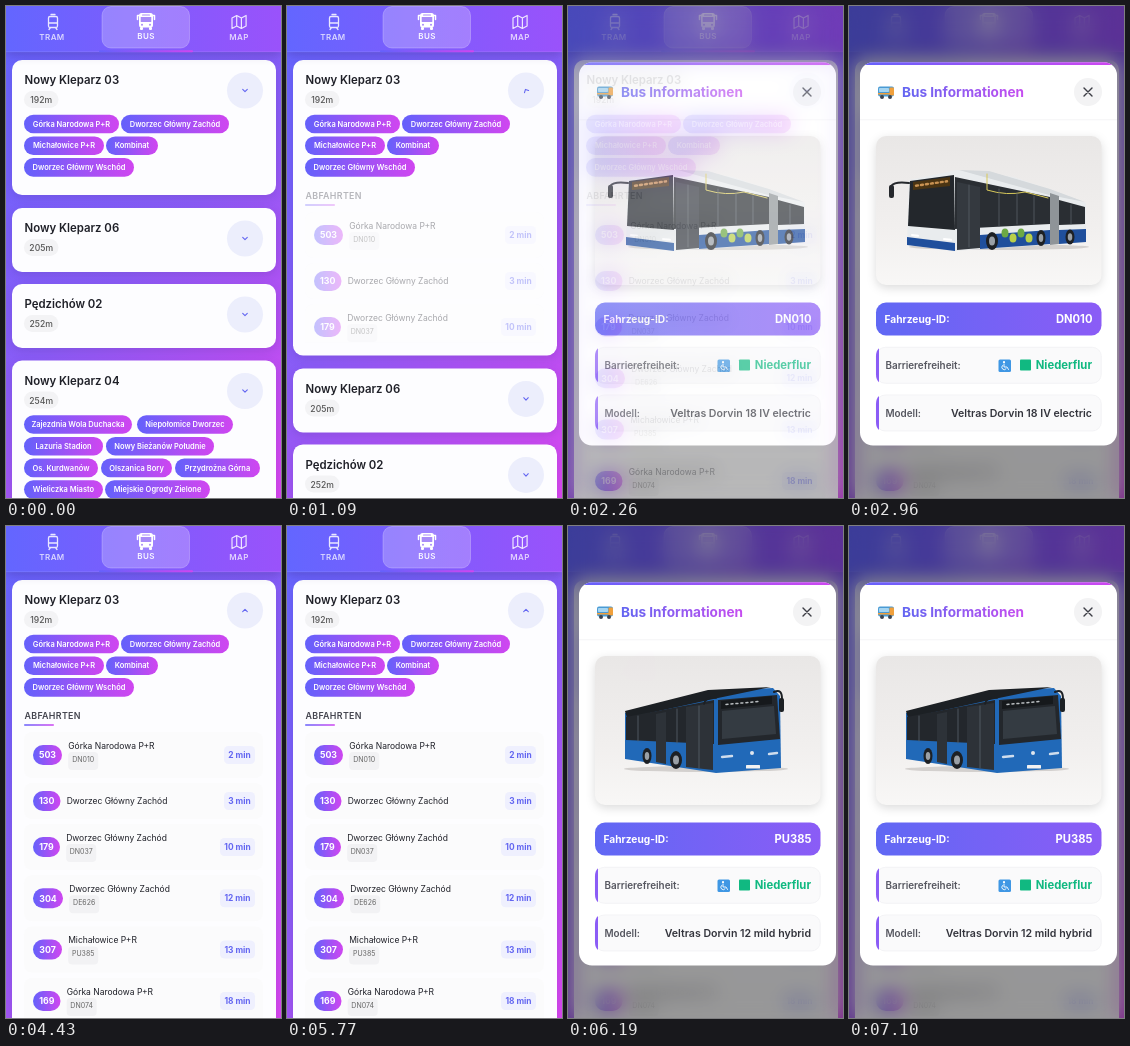
Recreate the animation shown at these times as an HTML page. Size 275 by 492 pixels, loop 8000 ms.

```html
<!DOCTYPE html>
<html lang="de">
<head>
<meta charset="utf-8">
<title>Abfahrten</title>
<style>
  html, body { margin: 0; width: 100%; height: 100%; overflow: hidden; }
  body { position: relative; background: linear-gradient(135deg, #6366ff, #8b5cf6 50%, #d946ef); }
  svg { position: absolute; inset: 0; width: 100%; height: 100%; font-family: Inter, sans-serif; }
  .card { filter: drop-shadow(0 3px 5px rgba(40, 20, 90, .14)); }
  #overlay { position: absolute; inset: 0; background: rgba(0, 0, 0, .4); backdrop-filter: blur(10px); }
</style>
</head>
<body>
<svg id="page" viewBox="0 0 275 492"></svg>
<div id="overlay"><svg id="modal" viewBox="0 0 275 492"></svg></div>
<script>
const $ = id => document.getElementById(id);

// ---- drawing helpers ----
const rect = (x, y, w, h, r, fill, more = '') =>
  `<rect x="${x}" y="${y}" width="${w}" height="${h}" rx="${r}" fill="${fill}" ${more}/>`;
const circle = (x, y, r, fill) => `<circle cx="${x}" cy="${y}" r="${r}" fill="${fill}"/>`;
const poly = (fill, points) => `<polygon fill="${fill}" points="${points}"/>`;
const line = (d, color, width, more = '') =>
  `<path d="${d}" fill="none" stroke="${color}" stroke-width="${width}" stroke-linecap="round" stroke-linejoin="round" ${more}/>`;
// cy is the middle of the capitals
const text = (x, cy, size, weight, fill, str, anchor = 'start', more = '') =>
  `<text x="${x}" y="${cy + size * .364}" font-size="${size}" font-weight="${weight}" fill="${fill}" text-anchor="${anchor}" ${more}>${str}</text>`;
const gradient = (id, from, to) =>
  `<linearGradient id="${id}"><stop stop-color="${from}"/><stop offset="1" stop-color="${to}"/></linearGradient>`;

// ---- stop list ----
const pill = (x, w, cy, str) =>
  rect(x, cy - 9.3, w, 18.6, 9.3, 'url(#accent)') + text(x + w / 2, cy, 7.5, 600, '#fff', str, 'middle');

const cardHead = (top, name, distance, rows = []) =>
  text(18.5, top + 20, 11.4, 600, '#1f2028', name) +
  rect(18, top + 31, 34.5, 17, 8.5, '#f3f3f5') +
  text(35.2, top + 40, 8.6, 500, '#555', distance, 'middle') +
  circle(239, top + 30.5, 18, '#eceefc') +
  rows.map((row, i) => row.map(([x, w, str]) => pill(x, w, top + 64 + i * 21.7, str)).join('')).join('');

const chevron = (cy, id = '') =>
  `<g transform="translate(239 ${cy})"><g id="${id}">${line('M-2.3 -1.2L0 1.2L2.3 -1.2', '#6366f1', 1.1)}</g></g>`;

const card = (top, height, ...head) =>
  `<g class="card">${rect(6, top, 264, height, 10, '#fdfdff')}</g>` + cardHead(top, ...head) + chevron(top + 30.5);

const departure = (cy, number, badge, name, id, time) => {
  const h = id ? 46 : 36, x = 33.2 + badge, w = time > 9 ? 35 : 31;
  return rect(18, cy - h / 2, 239, h, 8, '#fbfbfc') +
    rect(27, cy - 10, badge, 20, 10, 'url(#accent)') +
    text(27 + badge / 2, cy, 8.8, 700, '#fff', number, 'middle') +
    text(x, cy - (id ? 9.5 : 0), 8.5, 400, '#1f2028', name) +
    (id ? rect(x, cy - 3, 30, 18, 4, '#f2f2f4') + text(x + 15, cy + 4, 7, 400, '#666', id, 'middle') : '') +
    rect(249 - w, cy - 9, w, 18, 4.5, '#eff0fe') +
    text(249 - w / 2, cy, 8.4, 700, '#6366f1', time + ' min', 'middle');
};

const header = `<g id="header">` +
  rect(0, 0, 275, 46, 0, 'url(#bar)', 'style="filter:drop-shadow(0 3px 5px rgba(40,20,90,.25))"') +
  rect(0, 45.5, 275, .7, 0, 'rgba(255,255,255,.15)') +
  rect(93, 44.2, 94, 2, 1, 'url(#accent)') +
  rect(96, .5, 87.5, 41.5, 9, 'rgba(255,255,255,.23)', 'stroke="rgba(255,255,255,.3)" stroke-width=".8"') +
  [['TRAM', 46, 31, .75], ['BUS', 140, 30, .95], ['MAP', 233, 31, .75]].map(([s, x, y, a]) =>
    text(x, y, 8, 600, `rgba(255,255,255,${a})`, s, 'middle', 'letter-spacing=".4"')).join('') +
  line('M44 10.5h6q1.5 0 1.5 1.5v8q0 1.5-1.5 1.5h-6q-1.5 0-1.5-1.5v-8q0-1.5 1.5-1.5zM42.5 17h9M45 8.5h4M44.5 21.5l-1.5 2M49.5 21.5l1.5 2', '#fff', 1.3, 'opacity=".85"') +
  rect(133, 7, 14, 14.5, 2.5, '#fff') + rect(134.7, 11, 10.6, 5, .5, '#a98cf8') +
  rect(136, 8.6, 8, 1, .5, '#a98cf8') + circle(136, 18.7, 1, '#a98cf8') + circle(144, 18.7, 1, '#a98cf8') +
  rect(134, 21, 3, 3, 1, '#fff') + rect(143, 21, 3, 3, 1, '#fff') +
  line('M133 9.5h-1.5v4M147 9.5h1.5v4', '#fff', 1.5) +
  line('M226 12l4.7-2.5l4.7 2.5l4.7-2.5v10.5l-4.7 2.5l-4.7-2.5l-4.7 2.5zM230.7 9.5v10.5M235.4 12v10.5', '#fff', 1.2, 'opacity=".85"') +
  `</g>`;

$('page').innerHTML = `<defs>${gradient('accent', '#6461fb', '#d046f0')}${gradient('bar', '#6366ff', '#9a52fb')}
  <clipPath id="clip"><rect id="clipBox" x="6" y="176" width="264" height="0"/></clipPath></defs>` +
  `<g class="card"><rect id="firstCard" x="6" y="54" width="264" rx="10" fill="#fdfdff"/></g>` +
  cardHead(54, 'Nowy Kleparz 03', '192m', [
    [[18, 95, 'Górka Narodowa P+R'], [115, 108, 'Dworzec Główny Zachód']],
    [[18, 80, 'Michałowice P+R'], [100, 52, 'Kombinat']],
    [[18, 110, 'Dworzec Główny Wschód']]]) +
  chevron(84.5, 'arrow') +
  `<g clip-path="url(#clip)"><g id="departures">` +
  text(18.5, 190, 8.9, 600, '#44454f', 'ABFAHRTEN', 'start', 'letter-spacing=".3"') +
  rect(18, 198.3, 30, 1.5, .7, 'url(#accent)') +
  departure(229, 503, 29, 'Górka Narodowa P+R', 'DN010', 2) +
  departure(275, 130, 27.5, 'Dworzec Główny Zachód', '', 3) +
  departure(321, 179, 27, 'Dworzec Główny Zachód', 'DN037', 10) +
  departure(372.3, 304, 30, 'Dworzec Główny Zachód', 'DE626', 12) +
  departure(423.5, 307, 29, 'Michałowice P+R', 'PU385', 13) +
  departure(475, 169, 27.5, 'Górka Narodowa P+R', 'DN074', 18) +
  `</g></g><g id="others">` +
  card(202, 64, 'Nowy Kleparz 06', '205m') +
  card(278, 64, 'Pędzichów 02', '252m') +
  card(354.5, 170, 'Nowy Kleparz 04', '254m', [
    [[18, 108, 'Zajezdnia Wola Duchacka'], [131, 96, 'Niepołomice Dworzec']],
    [[18, 79, 'Lazuria Stadion'], [100, 108, 'Nowy Bieżanów Południe']],
    [[18, 74, 'Os. Kurdwanów'], [95, 71, 'Olszanica Bory'], [169, 85, 'Przydrożna Górna']],
    [[18, 79, 'Wieliczka Miasto'], [99, 105, 'Miejskie Ogrody Zielone']]]) +
  `</g>` + header;

// ---- vehicle dialog ----
const wheel = (x, y, rx, ry) =>
  `<ellipse cx="${x}" cy="${y}" rx="${rx}" ry="${ry}" fill="#1d2024"/><ellipse cx="${x}" cy="${y}" rx="${rx * .5}" ry="${ry * .5}" fill="#9aa0a6"/>`;
const shadow = (x, y, rx) => `<ellipse cx="${x}" cy="${y}" rx="${rx}" ry="3" fill="#d3d0ce"/>`;

const longBus = shadow(150, 241, 90) +
  poly('#e9ecee', '60,174 108,164 165,171 201,184 237,197 237,236 106,245 58,239') +
  poly('#d5d9dc', '110,164 140,165 201,183 236,196 200,189') +
  poly('#23272c', '61,175 105,169 106,224 59,220') +
  poly('#2a2e33', '106,171 201,191 201,218 106,223') +
  poly('#2a2e33', '210,194 236,201 236,218 210,219') +
  poly('#34393f', '108,176 131,181 131,242 108,244') +
  poly('#1f4f9c', '58,231 106,237 106,245 58,239') +
  poly('#1f4f9c', '131,229 201,224 201,238 131,243') +
  poly('#1f4f9c', '210,224 237,223 237,236 210,238') +
  poly('#8f9498', '201,187 210,190 210,238 201,239') +
  poly('#4a3413', '64,176 101,171 101,180 64,184') +
  line('M67 179.7L98 175.3', '#c99252', 2.4, 'stroke-dasharray="2 3"') +
  line('M138 168v16q20 6 38 2l23 6', '#d8c95a', 1) +
  [156, 164, 172, 180].map((x, i) => `<ellipse cx="${x}" cy="${227 + i % 2 * 5}" rx="3.5" ry="4.5" fill="${i % 2 ? '#b9cf4a' : '#6ca944'}"/>`).join('') +
  line('M120 179v62M150 183v37M168 187v31M185 190v28M222 199v19', '#596067', .8) +
  line('M60 177Q46 175 42 180', '#25282c', 2) + rect(40, 179, 5, 13, 2, '#25282c') +
  line('M63 229l6 .8M95 233l7 .8', '#fff', 2) +
  wheel(143, 235, 6, 9) + wheel(192, 232, 4.5, 8) + wheel(221, 231, 4.5, 7.5);

const shortBus = shadow(138, 243, 82) +
  poly('#2169b8', '57,187 140,165 205,162 212,170 213,242 148,247 57,233') +
  poly('#1c2024', '57,185 140,164 203,161 150,172 59,192') +
  poly('#23272c', '58,191 146,174 146,218 58,214') +
  poly('#23272c', '150,174 209,169 212,213 150,219') +
  poly('#2d3238', '118,181 145,177 145,244 118,241') +
  poly('#2d3238', '88,188 98,186 98,238 88,236') +
  poly('#343b42', '154,185 206,180 208,208 154,213') +
  poly('#16191c', '153,175 204,170 204,178 153,183') +
  line('M158 178.5L190 175.5', '#b9bdc0', 1.5, 'stroke-dasharray="2 3"') +
  line('M70 190v25M109 183v34M131 180v62', '#5a646d', .8) +
  line('M154 231l10-1M201 228l8-1', '#cfdded', 2.4) +
  rect(178, 239, 14, 3.5, .5, '#f2f2f2') + circle(184, 227, 2, '#dfe6ee') +
  line('M206 166Q214 162 214 173', '#1c2024', 2) + rect(211, 172, 5, 14, 2, '#1c2024') +
  line('M148 172Q138 170 136 178', '#1c2024', 1.6) +
  wheel(108, 234, 6, 9) + wheel(79, 230, 4.5, 8);

const infoRow = (cy, label) =>
  rect(27.3, cy - 18, 225, 36, 9, '#fafafb', 'stroke="#efeff2" stroke-width=".7"') +
  `<path d="M30 ${cy - 17}q-3 2.5-3 8v18q0 5.5 3 8z" fill="#8b5cf6"/>` +
  text(36.5, cy, 9.9, 600, '#55565f', label);

const vehicle = (id, fleet, model, bus) => `<g id="${id}">` + bus +
  text(243.5, 313, 11.2, 700, '#fff', fleet, 'end') + text(243, 407, 10.6, 600, '#33343c', model, 'end') + '</g>';

$('modal').innerHTML = `<defs>${gradient('title', '#6366f1', '#c64df0')}${gradient('idBar', '#6068f4', '#8b5cf6')}
  <linearGradient id="studio" x2="0" y2="1"><stop stop-color="#e9e7e6"/><stop offset=".6" stop-color="#f1efee"/><stop offset="1" stop-color="#f8f7f6"/></linearGradient>
  <clipPath id="frame"><rect x="11" y="56.2" width="257" height="383.3" rx="13"/></clipPath></defs>
  <g id="dialog"><g clip-path="url(#frame)">` +
  rect(11, 56, 257, 384, 0, '#fff') + rect(11, 56, 257, 3, 0, 'url(#accent)') + '</g>' +
  rect(11, 113.5, 257, .7, 0, '#f0f0f2') +
  rect(29, 80.5, 16, 10, 2, '#4a9bd4') + rect(30, 82, 10, 4, .8, '#a5d5f2') +
  rect(40.5, 81.5, 4.5, 8, 1, '#f0a03c') + rect(29, 87, 16, 1.5, 0, '#f0a03c') +
  circle(33, 91, 2, '#39424e') + circle(41, 91, 2, '#39424e') +
  text(53, 86.3, 13.6, 700, 'url(#title)', 'Bus Informationen') +
  circle(239, 86, 14, '#f3f3f4') + line('M235 82l8 8M243 82l-8 8', '#3c3d45', 1.4) +
  rect(27, 130, 225.5, 149, 10, 'url(#studio)', 'style="filter:drop-shadow(0 3px 5px rgba(0,0,0,.14))"') +
  rect(27, 296.5, 225.5, 33, 10, 'url(#idBar)') + text(35.5, 313, 10.2, 700, '#fff', 'Fahrzeug-ID:') +
  infoRow(359.3, 'Barrierefreiheit:') + infoRow(407, 'Modell:') +
  rect(149.5, 353.5, 12.5, 12.5, 1.5, '#3f97e4') + circle(155, 356.2, 1.1, '#fff') +
  line('M155 358v3h3l1.5 2.5M153.5 359.5a2.4 2.4 0 1 0 3.5 3.4', '#fff', .9) +
  rect(171, 353.5, 11, 11, .8, '#10b981') + text(243, 359.3, 11.3, 700, '#10b981', 'Niederflur', 'end') +
  vehicle('first', 'DN010', 'Veltras Dorvin 18 IV electric', longBus) +
  vehicle('second', 'PU385', 'Veltras Dorvin 12 mild hybrid', shortBus) + '</g>';

// ---- timing ----
const bezier = (x1, y1, x2, y2) => p => {
  if (p <= 0) return 0;
  if (p >= 1) return 1;
  const at = (a, b, s) => 3 * a * s * (1 - s) ** 2 + 3 * b * s * s * (1 - s) + s ** 3;
  let lo = 0, hi = 1;
  for (let i = 0; i < 24; i++) {
    const mid = (lo + hi) / 2;
    if (at(x1, x2, mid) < p) lo = mid; else hi = mid;
  }
  return at(y1, y2, lo);
};
const ease = bezier(.25, .1, .25, 1), standard = bezier(.4, 0, .2, 1), settle = bezier(.16, 1, .3, 1);

const LOOP = 8000, EXPAND = 920, OPEN_FIRST = 2100, CLOSE_FIRST = 4430, OPEN_SECOND = 5820;

function draw(t) {
  const grow = standard((t - EXPAND) / 560), extra = 420 * grow;
  $('firstCard').setAttribute('height', 135 + extra);
  $('clipBox').setAttribute('height', extra);
  $('departures').setAttribute('opacity', grow);
  $('others').setAttribute('transform', `translate(0 ${extra})`);
  $('arrow').setAttribute('transform', `rotate(${180 * standard((t - EXPAND) / 300)})`);

  const isFirst = t < CLOSE_FIRST, since = t - (isFirst ? OPEN_FIRST : OPEN_SECOND);
  $('overlay').style.display = since > 0 ? '' : 'none';
  $('overlay').style.opacity = ease(since / 400);
  const rest = 1 - settle(since / 200);
  $('dialog').setAttribute('transform', `translate(139.5 ${248 + 16 * rest}) scale(${1 - .05 * rest}) translate(-139.5 -248)`);
  $('first').style.display = isFirst ? '' : 'none';
  $('second').style.display = isFirst ? 'none' : '';
}

const start = performance.now();
(function tick() {
  draw((performance.now() - start) % LOOP);
  requestAnimationFrame(tick);
})();
</script>
</body>
</html>
```
